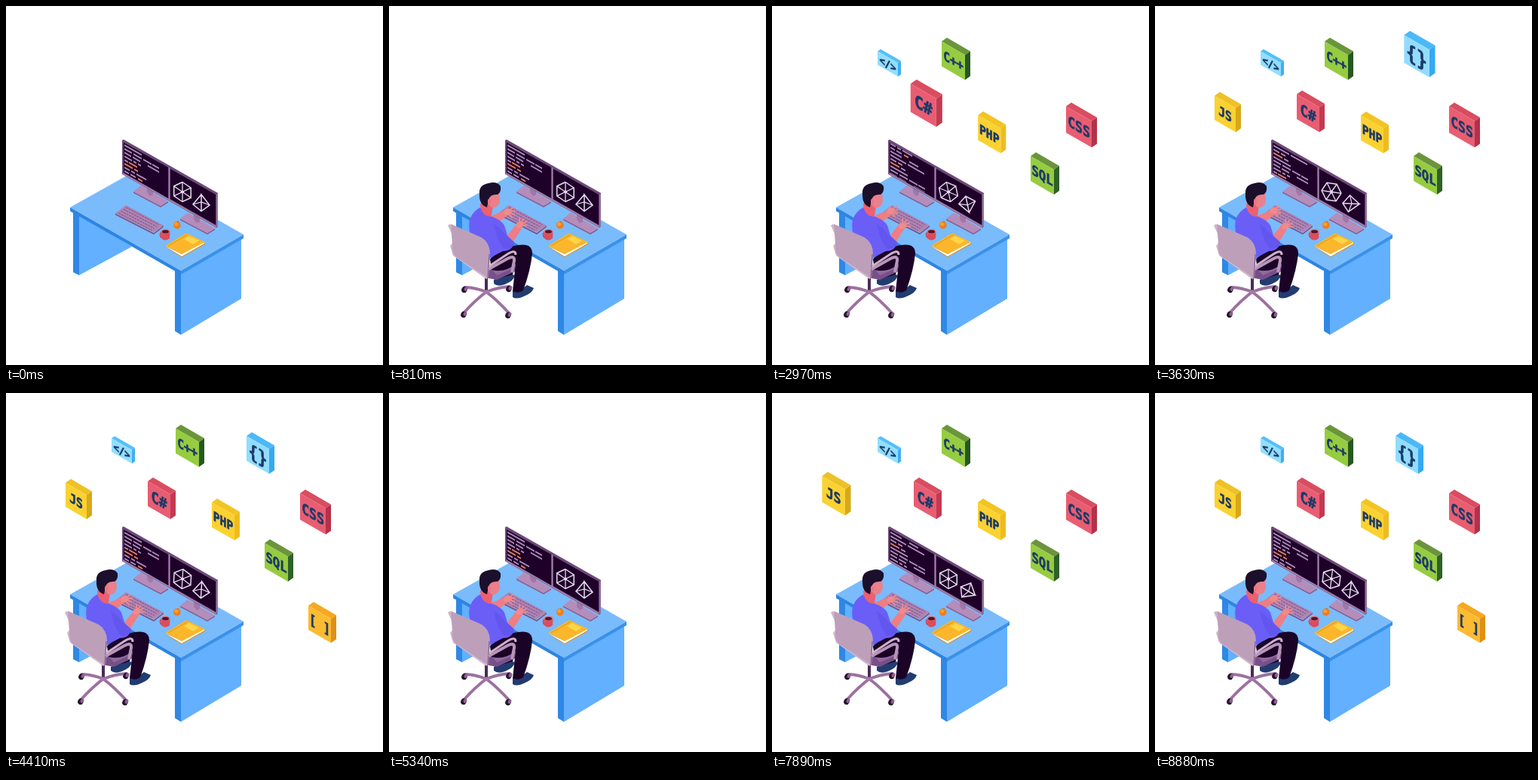
Recreate the animation shown at these times as an HTML page with a canvas. Size 500 px wide and 476 px high, loop 8.91 s.

```html
<!DOCTYPE html>
<html lang="en">
<head>
<meta charset="utf-8">
<title>Developer at work</title>
<style>
html, body { margin: 0; width: 100%; height: 100%; overflow: hidden; background: #fff; }
canvas { display: block; width: 500px; height: 476px; }
</style>
</head>
<body>
<canvas id="stage" width="500" height="476"></canvas>
<script>
const canvas = document.getElementById('stage');
const ctx = canvas.getContext('2d');
const LOOP = 8910, CYCLE = 4500, CUT = 4440;
const SLIDE = 840, WORK = 1290, WORK_LEN = CUT - WORK;
const ISO = 0.577;
const ORIGIN = { x: 219, y: 220 };
const INK = '#1d3a68';

const clamp = (v) => Math.max(0, Math.min(1, v));
const easeInOut = (u) => (1 - Math.cos(Math.PI * u)) / 2;

// Points come as a flat x, y list.
function poly(color, ...p) {
  ctx.beginPath();
  for (let i = 0; i < p.length; i += 2) ctx.lineTo(p[i], p[i + 1]);
  ctx.closePath();
  ctx.fillStyle = color;
  ctx.fill();
}

function line(color, width, ...p) {
  ctx.beginPath();
  for (let i = 0; i < p.length; i += 2) ctx.lineTo(p[i], p[i + 1]);
  ctx.strokeStyle = color;
  ctx.lineWidth = width;
  ctx.stroke();
}

function shape(color, d) {
  ctx.fillStyle = color;
  ctx.fill(new Path2D(d));
}

function curve(color, width, d) {
  ctx.strokeStyle = color;
  ctx.lineWidth = width;
  ctx.stroke(new Path2D(d));
}

function oval(color, x, y, rx, ry, turn = 0) {
  ctx.beginPath();
  ctx.ellipse(x, y, rx, ry, turn, 0, Math.PI * 2);
  ctx.fillStyle = color;
  ctx.fill();
}

function drawDesk() {
  poly('#62b0ff', 97, 277, 167, 319, 97, 357);
  poly('#2f88e5', 89, 272, 97, 276, 97, 357, 89, 353);
  poly('#62b0ff', 232, 355, 312, 308, 312, 388, 232, 436);
  poly('#2f88e5', 224, 350, 232, 355, 232, 436, 224, 431);
  poly('#7abbfb', 85, 267, 169, 220, 315, 303, 232, 351);
  poly('#2d85e3', 85, 267, 232, 351, 232, 356, 85, 272);
  poly('#3a91ea', 232, 351, 315, 303, 315, 308, 232, 356);
}

function drawStand(x, y) {
  poly('#8a5f92', x, y, x + 36, y + 19, x + 46, y + 13, x + 46, y + 15, x + 36, y + 21, x, y + 2);
  poly('#b58dba', x, y, x + 10, y - 8, x + 46, y + 13, x + 36, y + 19);
  poly('#a077a8', x + 18, y - 8, x + 26, y - 4, x + 26, y + 4, x + 22, y + 6, x + 18, y + 1);
}

// Segments are [start, end, orange?].
const ROWS = [
  [[1, 24]],
  [[1, 11], [13, 24], [26, 37], [38, 47]],
  [[1, 10], [12, 22], [32, 47]],
  [[1, 11], [13, 17], [19, 23]],
  [[1, 6], [7, 18, 1]],
  [[1, 12, 1], [14, 19, 1]],
  [[1, 8], [10, 15], [17, 30]],
  [[1, 7], [9, 16], [19, 25, 1]],
  [[1, 16], [26, 38]],
  [[1, 22], [24, 46]],
  [[1, 9], [11, 17]],
  [[1, 13, 1], [15, 21]]
];

function drawCode(scroll) {
  const pitch = 4.9;
  ctx.save();
  ctx.transform(1, 0.563, 0, 1, 156, 181);
  ctx.beginPath();
  ctx.rect(0, 0, 59, 40);
  ctx.clip();
  const first = Math.floor(scroll);
  for (let i = 0; i < 10; i++) {
    const row = ROWS[(first + i) % ROWS.length];
    const y = 2 + (first + i - scroll) * pitch;
    for (const [a, b, hot] of row) {
      ctx.fillStyle = hot ? '#ee8259' : '#b48fc0';
      ctx.fillRect(a, y, b - a, 2);
    }
  }
  ctx.restore();
}

function drawWires(turn) {
  const color = '#eadcf2';
  ctx.save();
  ctx.translate(234, 246.5);
  ctx.transform(1, 0.1, 0, 1, 0, 0);
  ctx.rotate(-turn);
  const ring = [];
  for (let i = 0; i < 6; i++) {
    const a = Math.PI / 3 * i - Math.PI / 2;
    ring.push(13 * Math.cos(a), 13 * Math.sin(a));
  }
  line(color, 1.5, ...ring, ring[0], ring[1]);
  for (let i = 0; i < 12; i += 2) line(color, 1.3, 0, 0, ring[i], ring[i + 1]);
  oval(color, 0, 0, 2.2, 1.8);
  ctx.restore();

  ctx.save();
  ctx.translate(259, 262);
  ctx.rotate(-turn);
  line(color, 1.5, 0, -12, -11, 1, 0, 10, 11, 2, 0, -12, 0, 10);
  line(color, 1.2, -11, 1, 0, -2, 11, 2);
  ctx.restore();
}

function drawMonitors(work) {
  drawStand(169, 246);
  drawStand(231, 282);
  poly('#6d4a79', 154, 178, 156, 177, 281, 248, 281, 292, 279, 294, 154, 223);
  poly('#1e0029', 156, 181, 215, 214, 215, 255, 156, 221);
  poly('#1e0029', 218, 216, 278, 250, 278, 290, 218, 256);
  line('#a782ad', 1.6, 155, 222, 279, 292.5);
  line('#a782ad', 1.2, 216.5, 214, 216.5, 257);
  line('#a782ad', 1.4, 280, 249, 280, 292);
  drawCode(work * ROWS.length);
  drawWires(work * Math.PI * 2);
}

function drawKeyboard() {
  poly('#7d5387', 145, 275, 196, 301, 209, 291, 209, 293, 196, 303, 145, 277);
  poly('#b084b3', 145, 275, 159, 264, 209, 291, 196, 300);
  for (let r = 0; r < 4; r++) {
    const x = 149.5 + r * 3.2, y = 274.5 - r * 2.5;
    ctx.setLineDash([3, 1]);
    line('#8d6195', 1.5, x, y, x + 44, y + 23);
  }
  ctx.setLineDash([]);
}

function drawThings() {
  oval('#ef7d18', 226.8, 290.5, 4.8, 5);
  oval('#ff9b33', 225.8, 289.3, 2.7, 2.5);
  line('#8a6a20', 1, 227, 287, 228.5, 285.5);

  curve('#cf4052', 1.6, 'M207 300 C203 301 204 308 209 307');
  shape('#dc4c5c', 'M205.5 299 L206 308 Q211 313 217 308 L217.5 299 Z');
  oval('#e96a74', 211.5, 299, 6, 3.3);
  oval('#4c1826', 211.5, 299.2, 4.4, 2.2);

  poly('#d9901c', 211, 320, 233, 331, 264, 314, 264, 316, 233, 333);
  poly('#ffffff', 212, 319, 233, 329, 263, 312, 263, 315, 233, 332);
  poly('#fbb62b', 211, 318, 239, 301, 264, 313, 233, 329);
  poly('#fdd548', 236, 309, 243, 305, 256, 311, 248, 316);
  line('#dc9820', 1, 215, 318, 241, 303);
}

function drawChairBase() {
  const hub = [129, 379];
  const feet = [[101, 376], [160, 375], [100, 409], [159, 410]];
  ctx.lineCap = 'round';
  for (const [x, y] of feet) {
    const mx = (x + hub[0]) / 2, my = (y + hub[1]) / 2 - 4;
    curve('#9c719f', 4, `M${hub} Q${mx} ${my} ${x} ${y - 3}`);
    oval('#28122f', x - 1, y, 3.7, 4.3, 0.4);
    oval('#8b6290', x + 1, y - 1, 2.2, 3, 0.4);
  }
  ctx.lineCap = 'butt';
  poly('#4b2b57', 127, 356, 131, 356, 131, 380, 127, 380);
  oval('#a67aaa', 129, 379, 4, 2.5);
}

function drawHand(x, y, side) {
  ctx.lineCap = 'round';
  oval('#f18a8c', x, y, 5, 4, -0.5);
  for (let i = 0; i < 4; i++) {
    const a = -1.9 + i * 0.55 + side;
    line('#f18a8c', 1.9, x, y, x + 10 * Math.cos(a), y + 9 * Math.sin(a));
  }
  ctx.lineCap = 'butt';
}

function drawPerson(beat) {
  drawChairBase();
  // far leg and shoe
  shape('#223c70', 'M139 363 L157 354 L167 357 Q166 364 154 369 Q144 373 139 368 Z');
  shape('#140022', 'M135 334 L172 323 L164 356 L146 361 Z');
  // seat
  shape('#77508a', 'M132 348 L160 338 L177 343 Q180 347 174 349 L143 363 L132 361 Z');
  shape('#93699d', 'M134 347 L158 339 L174 344 L143 357 Z');
  // near leg and shoe
  shape('#223c70', 'M164 377 Q174 378 183 370 L192 374 Q190 380 181 384 Q169 390 164 386 Z');
  shape('#1b0328', 'M134 336 Q148 320 171 317 Q190 314 190 328 Q188 350 178 377 Q172 382 164 378 L168 342 Q154 354 136 350 Z');

  // far arm
  shape('#ef7d84', 'M136 278 L156 270 L162 274 L141 290 Z');
  drawHand(157, 273 + beat, 1.2);

  // head
  shape('#ec6070', 'M121 262 L139 258 L136 278 Q130 286 122 276 Z');
  shape('#e9808c', 'M130 246 L146 247 L147 259 Q144 269 136 267 L128 259 Z');
  shape('#1b0f2b', 'M120 249 Q119 237 132 235 Q143 232 148 239 Q149 247 144 250 Q134 249 132 257 L130 267 Q119 263 120 249 Z');
  oval('#ed7580', 133, 259, 2.1, 3.4);

  // torso and near arm
  shape('#6a5ef7', 'M121 267 Q126 281 136 279 Q149 284 153 291 L157 304 L166 313 Q164 325 151 325 L134 334 Q113 323 108 304 Q101 278 121 267 Z');
  shape('#f07d83', `M157 304 L170 ${288 + beat * 0.5} L178 ${292 + beat * 0.5} L165 312 Z`);
  drawHand(173, 290 - beat, 0.35);
  shape('#6256ee', 'M139 289 Q149 296 157 306 L166 313 Q166 322 153 322 Q144 313 139 289 Z');

  // chair back
  shape('#d1b7cd', 'M81 289 L78 291 L84 304 L85 313 L81 318 L85 331 L129 362 L132 360 Z');
  shape('#bd9fba', 'M82 289 L123 307 Q134 314 134 329 L132 361 L88 332 Q83 327 84 316 Z');
  curve('#86608e', 1.2, 'M133 329 L131 361');
  // armrest
  curve('#b895b9', 4, 'M132 349 L157 335 Q167 330 166 338 L163 353');
  curve('#cfb1ce', 3, 'M133 345 L157 329 Q168 322 168 330');
}

const TILES = [
  { text: 'CSS', x: 390, y: 133, w: 34, h: 35, size: 19, tone: ['#e95d72', '#d94d60', '#b3314a'] },
  { text: 'SQL', x: 343, y: 199, w: 31, h: 33, size: 18, tone: ['#96cc40', '#6b943c', '#2e6128'] },
  { text: '</>', x: 140, y: 60, w: 27, h: 18, size: 14, depth: 4, tone: ['#91deff', '#54bff8', '#3eaff2'] },
  { text: 'C++', x: 225, y: 47, w: 31, h: 33, size: 17, tone: ['#96cc40', '#6a963a', '#275820'] },
  { text: 'PHP', x: 273, y: 145, w: 30, h: 33, size: 17, tone: ['#fbd231', '#f2c424', '#eebc20'] },
  { text: 'C#', x: 188, y: 117, w: 30, h: 33, size: 20, tone: ['#e95d72', '#d94d60', '#c23a52'] },
  { text: 'JS', x: 79, y: 119, w: 28, h: 32, size: 17, tone: ['#fbd231', '#edc127', '#d8a818'] },
  { text: '{}', x: 319, y: 57, w: 30, h: 33, size: 24, tone: ['#91dcff', '#4cb8f7', '#36a9f2'] },
  { text: '[ ]', x: 401, y: 282, w: 30, h: 32, size: 18, tone: ['#fcbb32', '#f4a922', '#e09014'] }
];
const FIRST_PEAK = 1710, GAP = 260, RISE = 120, SETTLE = 240, OVER = 1.18;

function tileScale(t, i) {
  const dt = t - FIRST_PEAK - GAP * i;
  if (dt < 0) return OVER * (1 - Math.pow(1 - clamp(1 + dt / RISE), 3));
  return OVER - (OVER - 1) * easeInOut(clamp(dt / SETTLE));
}

function drawTile({ text, x, y, w, h, size, depth = 7, tone }) {
  const drop = w * ISO, r = x + w, lift = depth * 0.7;
  poly(tone[1], x, y, x + depth, y - lift, r + depth, y + drop - lift, r, y + drop);
  poly(tone[2], r, y + drop, r + depth, y + drop - lift, r + depth, y + drop - lift + h, r, y + drop + h);
  poly(tone[0], x, y, r, y + drop, r, y + drop + h, x, y + h);
  ctx.save();
  ctx.transform(0.866, 0.5, 0, 1, x + w / 2, y + drop / 2 + h / 2);
  ctx.font = `bold ${size}px "DejaVu Sans Mono", monospace`;
  ctx.textAlign = 'center';
  ctx.textBaseline = 'alphabetic';
  ctx.fillStyle = ctx.strokeStyle = INK;
  ctx.lineWidth = 0.7;
  ctx.fillText(text, 0, size * 0.36);
  ctx.strokeText(text, 0, size * 0.36);
  ctx.restore();
}

function drawTiles(t) {
  TILES.forEach((tile, i) => {
    const s = tileScale(t, i);
    if (s <= 0) return;
    ctx.save();
    ctx.translate(ORIGIN.x, ORIGIN.y);
    ctx.scale(s, s);
    ctx.translate(-ORIGIN.x, -ORIGIN.y);
    drawTile(tile);
    ctx.restore();
  });
}

function draw(now) {
  let t = (now % LOOP) % CYCLE;
  if (t >= CUT) t = 0;
  const work = clamp((t - WORK) / WORK_LEN);
  const away = 290 * Math.pow(1 - clamp(t / SLIDE), 4);
  const beat = t > WORK ? 2 * Math.sin((t - WORK) / 55) : 0;

  ctx.fillStyle = '#fff';
  ctx.fillRect(0, 0, 500, 476);
  drawDesk();
  drawMonitors(work);
  drawKeyboard();
  drawThings();
  ctx.save();
  ctx.translate(-away, away);
  drawPerson(beat);
  ctx.restore();
  drawTiles(t);
}

let start;
function frame(now) {
  if (start === undefined) start = now;
  draw(now - start);
  requestAnimationFrame(frame);
}
requestAnimationFrame(frame);
</script>
</body>
</html>
```
